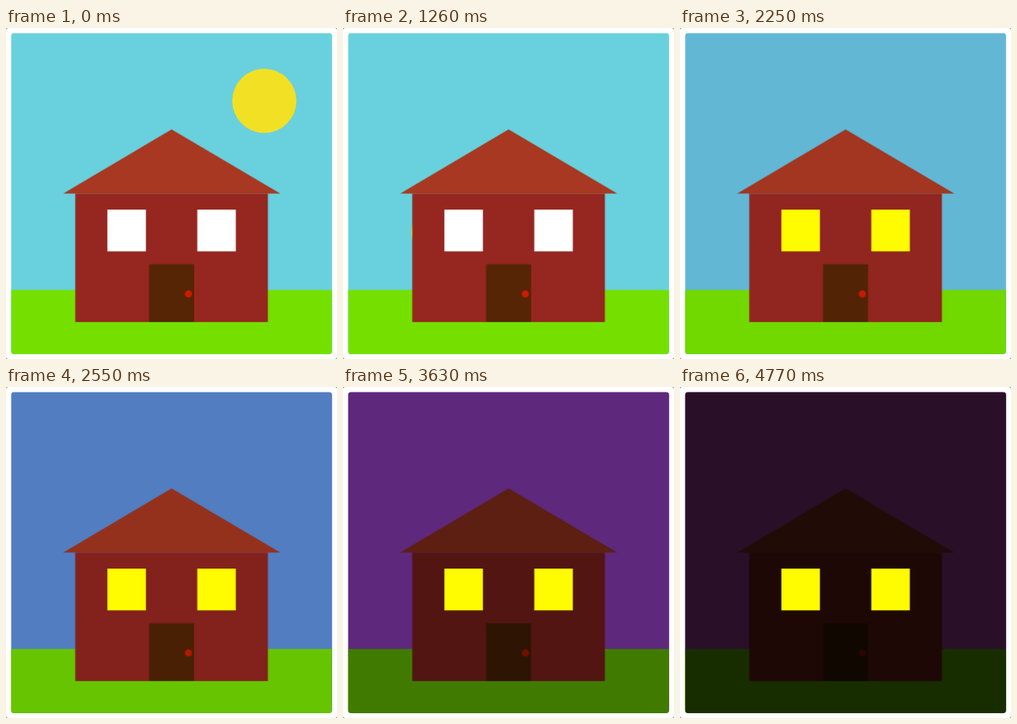
Write an HTML page without scripts that moves like this. It is 414 by 414 pixels and loops after 6.03 s.

```html
<!DOCTYPE html>
<html lang="en">
<head>
<meta charset="utf-8">
<title>House at nightfall</title>
<style>
html, body { margin: 0; width: 100%; height: 100%; overflow: hidden; background: #8a8a8a; }
svg { display: block; width: 100vw; height: 100vh; }

/* The -2ms delay keeps steps clear of the 30ms tick boundaries */
.sky, .sun, .shade, .windows { animation: 6030ms linear -2ms infinite; }
.sky { fill: #69d1dd; animation-name: sky; }
.sun { fill: #f2e024; animation-name: set; }
.shade { opacity: 0; animation-name: dim; }
.windows { fill: #fff; animation-name: lamps; }

@keyframes set {
  0% { transform: translate(315.5px, 84.5px); animation-timing-function: steps(42); }
  20.8955% { transform: translate(119px, 248px); animation-timing-function: steps(20); }
  30.8458% { transform: translate(23px, 328.5px); animation-timing-function: steps(9); }
  35.3234%, 100% { transform: translate(-20px, 364.5px); }
}
@keyframes sky {
  0%, 35.3234% { fill: rgb(105, 209, 221); animation-timing-function: steps(14); }
  42.2886% { fill: rgb(94, 143, 220); animation-timing-function: steps(15); }
  49.7512% { fill: rgb(94, 75, 222); animation-timing-function: steps(21); }
  60.199% { fill: rgb(172, 73, 226); animation-timing-function: steps(20); }
  70.1493% { fill: rgb(206, 66, 195); animation-timing-function: steps(18); }
  79.1045%, 100% { fill: rgb(205, 75, 200); }
}
@keyframes dim {
  0%, 35.3234% { opacity: 0; animation-timing-function: steps(88); }
  79.1045%, 100% { opacity: .8; }
}
@keyframes lamps {
  0% { fill: #fff; animation-timing-function: step-end; }
  35.3234%, 100% { fill: #fffb00; }
}
</style>
</head>
<body>
<svg viewBox="0 0 414 414">
  <defs>
    <clipPath id="card"><rect width="400" height="400" rx="4"/></clipPath>
  </defs>
  <rect width="414" height="414" rx="3" fill="#fff"/>
  <g transform="translate(6.3 6.3) scale(1.004)" clip-path="url(#card)">
    <rect class="sky" width="400" height="400"/>
    <circle class="sun" r="40"/>
    <rect y="320" width="400" height="80" fill="#75e000"/>
    <rect x="80" y="200" width="240" height="160" fill="#962620"/>
    <path d="M65 200 200 120 335.5 200Z" fill="#a83821"/>
    <rect x="172" y="288" width="56" height="72" fill="#552505"/>
    <circle cx="221" cy="325" r="4.5" fill="#cc1c00"/>
    <rect class="shade" width="400" height="400"/>
    <g class="windows">
      <rect x="120" y="220" width="48" height="52"/>
      <rect x="232" y="220" width="48" height="52"/>
    </g>
  </g>
</svg>
</body>
</html>
```
